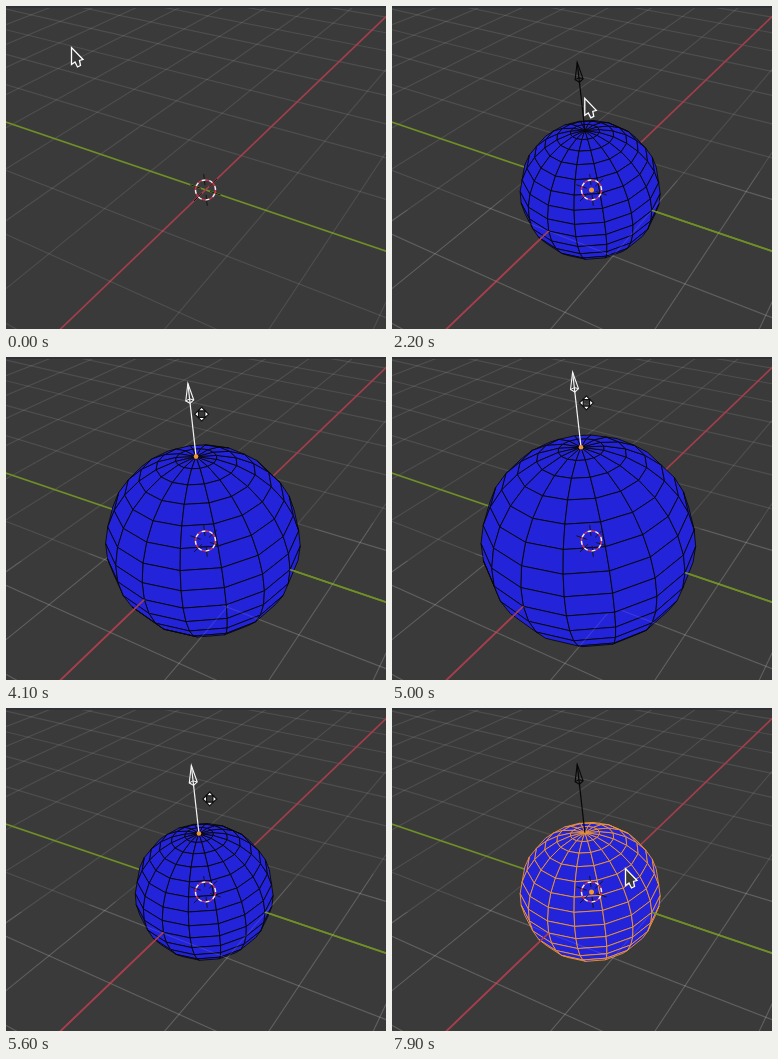
Recreate the animation shown at these times as an HTML page with a canvas. Size 380 by 323 pixels, loop 8000 ms.

```html
<!DOCTYPE html>
<html lang="en">
<head>
<meta charset="utf-8">
<title>Parametric sphere</title>
<style>
  html, body { margin: 0; width: 100%; height: 100%; overflow: hidden; background: #3a3a3a; }
  canvas { display: block; }
</style>
</head>
<body>
<canvas id="stage" width="380" height="323"></canvas>
<script>
const ctx = document.getElementById('stage').getContext('2d');
const { sin, cos, hypot, min, max, PI } = Math;
const TAU = 2 * PI, LOOP = 8000, STEP = 100;
const ORANGE = '#f0962e', WHITE = '#f4f4f4', BLACK = '#080808';

// Camera space: u points right, v towards the viewer, z up.
const PITCH = 0.6575, YAW = 1.0896, FACING = 0.18, SCALE = 69, DEPTH = 0.13;
const ORIGIN = [199.5, 183.9], SHIFT = 77;
const SP = sin(PITCH), CP = cos(PITCH), SY = sin(YAW), CY = cos(YAW);

function project(u, v, z) {
  const q = 1 - DEPTH * (v * CP + z * SP);
  return [ORIGIN[0] + SHIFT + (SCALE * u - SHIFT) / q, ORIGIN[1] + SCALE * (v * SP - z * CP) / q];
}
const ground = (a, b) => project(b * SY - a * CY, a * SY + b * CY, 0);
const height = z => project(0, 0, z);
const polar = (r, angle, z = 0) => project(r * sin(angle), r * cos(angle), z);
const range = (n, fn) => Array.from({ length: n }, (_, i) => fn(i));

// Linear moves between [time, ...values] points, each starting after a rest.
function track(points, t, rest = 0) {
  const n = points.findIndex(p => p[0] > t);
  if (n < 0) return points.at(-1).slice(1);
  if (n === 0) return points[0].slice(1);
  const [t0, ...from] = points[n - 1], [t1, ...to] = points[n];
  const f = max(0, (t - t0 - rest) / (t1 - t0 - rest));
  return from.map((x, i) => x + (to[i] - x) * f);
}

const grip = [199, 87];
const pointerPath = [
  [0, 65, 41], [400, 91, 60], [800, 62, 70], [1600, 178, 104], [2400, 198, 87], [2600, 231, 93],
  [2900, ...grip], [5400, ...grip], [6000, 222, 101], [6800, 277, 123], [7200, 245, 152], [7900, 233, 160]
];
const radiusPath = [[3700, 1], [4500, 1.75], [4800, 1.28], [5400, 1.97], [5600, 0.985], [6000, 1]];
const ARROW = 0.97;

function trace(points, close) {
  ctx.beginPath();
  points.forEach(p => ctx.lineTo(...p));
  if (close) ctx.closePath();
}
function stroke(points, color, width = 1, close = false) {
  trace(points, close);
  ctx.strokeStyle = color;
  ctx.lineWidth = width;
  ctx.stroke();
}
function shape(points, fill, line, width = 1) {
  trace(points, true);
  ctx.fillStyle = fill;
  ctx.fill();
  stroke(points, line, width, true);
}
function dot(x, y, r, color) {
  ctx.beginPath();
  ctx.arc(x, y, r, 0, TAU);
  ctx.fillStyle = color;
  ctx.fill();
}
function ring(x, y, r, color, width, from = 0, to = TAU) {
  ctx.beginPath();
  ctx.arc(x, y, r, from, to);
  ctx.strokeStyle = color;
  ctx.lineWidth = width;
  ctx.stroke();
}
function box(x, y, w, h, color, corner = 0) {
  ctx.beginPath();
  ctx.roundRect(x, y, w, h, corner);
  ctx.fillStyle = color;
  ctx.fill();
}

function drawGrid() {
  const far = 18, near = 8;
  const line = (i, side, cross, point, axis) => {
    const end = min(far, (near - i * side) / cross);
    if (end > -far) stroke([point(i, -far), point(i, end)], i ? 'rgba(255,255,255,.1)' : axis, i ? 1.1 : 1.6);
  };
  for (let i = -far; i <= far; i++) {
    line(i, SY, CY, ground, '#6f8f27');
    line(i, CY, SY, (b, a) => ground(a, b), '#a63d4c');
  }
}

function drawSphere(r, wire) {
  const N = 16;
  const vertex = (lat, lon) => {
    const a = lat * PI / N;
    return polar(r * sin(a), YAW - PI / 2 + lon * TAU / N, r * cos(a));
  };
  for (let i = 0; i < N; i++) {
    for (let j = 0; j < N; j++) {
      const quad = [vertex(i, j), vertex(i, j + 1), vertex(i + 1, j + 1), vertex(i + 1, j)];
      const [p, q, s, w] = quad;
      const area = (s[0] - p[0]) * (w[1] - q[1]) - (s[1] - p[1]) * (w[0] - q[0]);
      if (area > 0) shape(quad, '#2323da', wire, 0.9);
    }
  }
}

// The floor in front of the sphere covers its lower half.
function drawFrontGrid(r) {
  const arc = (radius, dir) => range(41, i => polar(radius, FACING + dir * (i / 40 - 0.5) * PI));
  ctx.save();
  trace([...arc(r, 1), ...arc(7, -1)], true);
  ctx.clip();
  drawGrid();
  ctx.restore();
}

function drawHandle(r, color) {
  const pole = height(r), tip = height(r + ARROW);
  const dx = tip[0] - pole[0], dy = tip[1] - pole[1], len = hypot(dx, dy);
  const x = dx / len, y = dy / len;
  const at = (along, side) => [tip[0] - x * along - y * side, tip[1] - y * along + x * side];
  const left = at(17, -4), right = at(17, 4), base = at(20, 0);
  stroke([pole, tip], color, 1.2);
  stroke([left, tip, right, base], color, 1.1, true);
  stroke([left, at(15.5, 0), right], color);
  return pole;
}

function drawCenterMark() {
  const [x, y] = ORIGIN, parts = 16;
  for (const end of [ground(1, 0), ground(0, 1), height(1)]) {
    const dx = end[0] - x, dy = end[1] - y, len = hypot(dx, dy);
    for (const s of [-1, 1])
      stroke([5, 16].map(d => [x + s * d * dx / len, y + s * d * dy / len]), '#151515');
  }
  for (let i = 0; i < parts; i++)
    ring(x, y, 10, i % 2 ? '#f6eef0' : '#d0324a', 1.5, i * TAU / parts, (i + 1) * TAU / parts);
}

function drawPopup() {
  const label = 'Add parametric Sphere';
  box(65.5, 55.5, 330, 249, 'rgba(32,32,32,.985)', 4);
  box(73, 63, 320, 18, '#535353', 4);
  box(102, 64, 114, 16, '#191919');
  box(215, 63, 2, 18, '#3f8fdc');
  box(70, 99, 310, 17, '#5173b2');
  ring(90, 70, 4.5, '#e4e4e4', 1.2);
  stroke([[86.8, 73.2], [82, 78]], '#e4e4e4', 1.6);
  ctx.fillStyle = '#fff';
  ctx.font = '10.5px "Noto Sans", "Open Sans", sans-serif';
  ctx.fillText(label, 102, 76);
  ctx.fillText('Object:', 74, 111);
  ctx.fillText(label, 195, 111);
}

const pointers = {
  arrow() {
    shape([[0.5, 0.5], [0.5, 17.5], [4, 15], [6.5, 20], [9.5, 18.5], [8.5, 13.5], [12, 12.5]], '#383838', '#fff', 1.3);
  },
  text() {
    for (const [color, width] of [['#222', 3.5], ['#fff', 1.6]]) {
      stroke([[0, -7], [0, 7]], color, width);
      for (const y of [-7.5, 7.5]) stroke([[-3, y], [3, y]], color, width);
    }
  },
  move() {
    for (let i = 0; i < 4; i++) {
      shape([[0, -7], [3.5, -3.2], [-3.5, -3.2]], '#fff', '#111', 1.2);
      ctx.rotate(PI / 2);
    }
  }
};

function drawPointer(kind, x, y) {
  ctx.save();
  ctx.translate(x, y);
  pointers[kind]();
  ctx.restore();
}

function draw(t) {
  const popup = t >= 1000 && t < 2200;
  const sphere = t >= 2200;
  const active = t >= 2800 && t < 7000;
  const dragging = t > 3700 && t < 6000;
  const selected = t >= 7400;
  const [r] = track(radiusPath, t);

  box(0, 0, 380, 323, '#3a3a3a');
  drawGrid();
  if (sphere) {
    drawSphere(r, selected ? ORANGE : BLACK);
    drawFrontGrid(r);
    const pole = drawHandle(r, dragging ? WHITE : active ? ORANGE : BLACK);
    if (active) dot(...pole, 2.3, ORANGE);
  }
  drawCenterMark();
  if (selected || (sphere && !active && t < 2800)) dot(...ORIGIN, 2.5, ORANGE);
  if (popup) drawPopup();

  // While dragging, the pointer keeps its distance to the arrow tip.
  const [x, y] = track(pointerPath, t, STEP);
  const rest = height(1 + ARROW), tip = height(r + ARROW);
  const kind = popup ? 'text' : t >= 2800 && t < 6500 ? 'move' : 'arrow';
  drawPointer(kind, x + tip[0] - rest[0], y + tip[1] - rest[1]);
  box(0, 0, 380, 2, '#2e3237');
}

const start = performance.now();
function tick() {
  const t = (performance.now() - start) % LOOP;
  draw(Math.floor(t / STEP) * STEP);
  requestAnimationFrame(tick);
}
tick();
</script>
</body>
</html>
```
